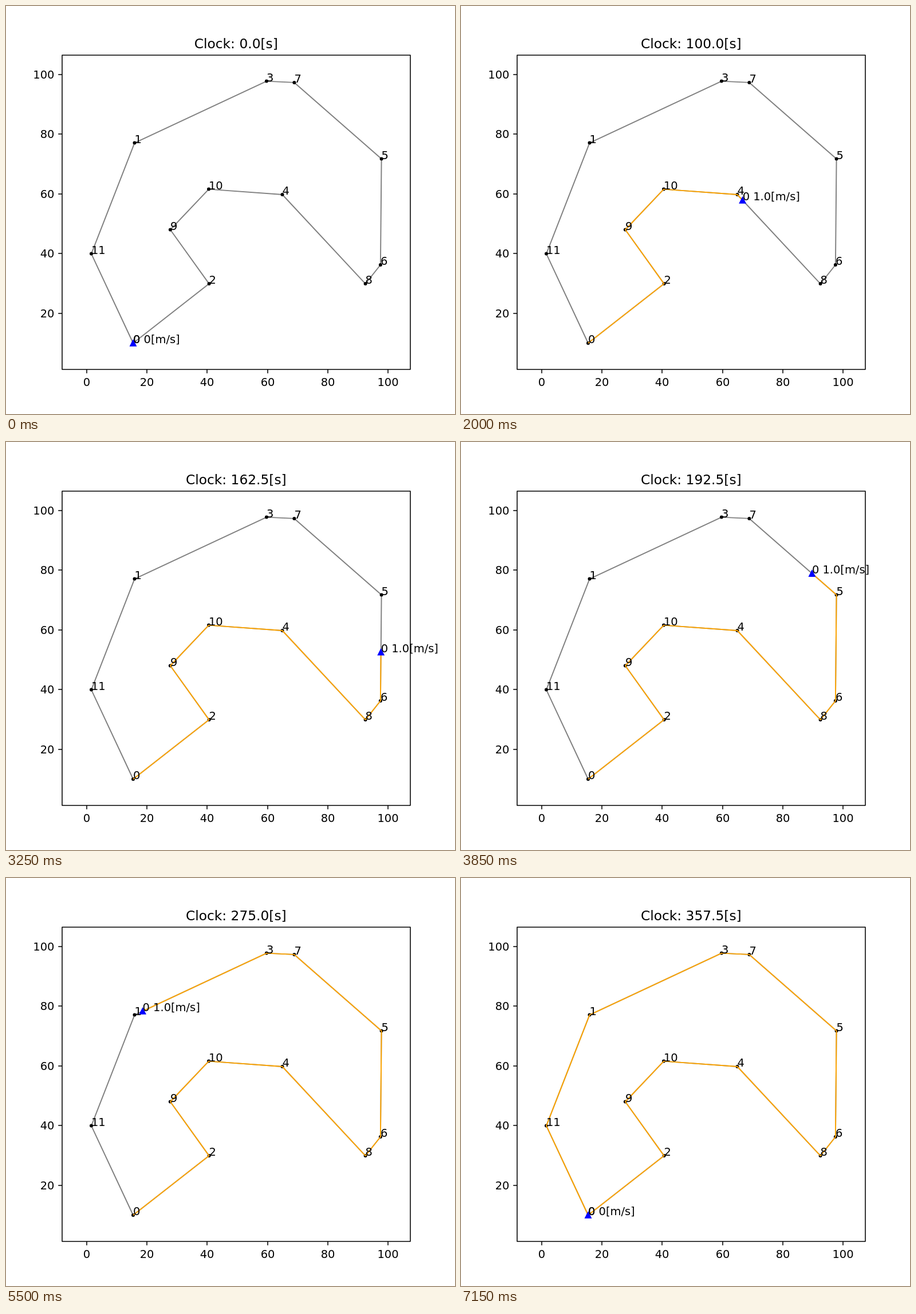
Recreate the animation shown at these times as an HTML page with a canvas. Size 784 by 714 pixels, loop 7200 ms.

```html
<!DOCTYPE html>
<html lang="en">
<head>
<meta charset="utf-8">
<title>Route clock</title>
<style>
html, body { margin: 0; width: 100%; height: 100%; overflow: hidden; background: #fff; }
canvas { display: block; }
</style>
</head>
<body>
<canvas id="stage" width="784" height="714"></canvas>
<script>
const ctx = document.getElementById("stage").getContext("2d");

const LOOP = 7200, STEP = 50, SECONDS_PER_STEP = 2.5;
const PT = 140 / 72; // pixels per point
const UNIT_X = 5.26, UNIT_Y = 5.225;
const BOX = { left: 98, right: 706, top: 86, bottom: 636 };

// The closed tour: label, x, y
const tour = [
  [0, 222, 590], [2, 354.6, 486.1], [9, 286.9, 391.5], [10, 354, 320.6],
  [4, 482.5, 330], [8, 627.6, 486.1], [6, 653.9, 453], [5, 655.6, 267.6],
  [7, 503.4, 133.9], [3, 454.9, 131.6], [1, 224.5, 239.6], [11, 149, 433.6]
].map(([label, x, y]) => ({ label, x, y }));
const route = [...tour, tour[0]];

// Length of each leg in data units
const legs = tour.map((a, i) => {
  const b = route[i + 1];
  return Math.hypot((b.x - a.x) / UNIT_X, (b.y - a.y) / UNIT_Y);
});
const total = legs.reduce((sum, d) => sum + d, 0);

// Points passed after travelling a distance; the last one is the vehicle
function travelled(dist) {
  const path = [route[0]];
  for (let i = 0; i < legs.length; i++) {
    const a = route[i], b = route[i + 1];
    const k = Math.min(1, dist / legs[i]);
    path.push({ x: a.x + (b.x - a.x) * k, y: a.y + (b.y - a.y) * k });
    if (k < 1) break;
    dist -= legs[i];
  }
  return path;
}

function text(str, x, y, size = 10, align = "left") {
  ctx.font = `${size * PT}px "DejaVu Sans", sans-serif`;
  ctx.textAlign = align;
  ctx.fillStyle = "#000";
  ctx.fillText(str, x, y);
}

function line(points, color, width) {
  ctx.beginPath();
  points.forEach(p => ctx.lineTo(p.x, p.y));
  ctx.strokeStyle = color;
  ctx.lineWidth = width * PT;
  ctx.stroke();
}

function drawAxes() {
  ctx.strokeStyle = "#000";
  ctx.lineWidth = 0.8 * PT;
  ctx.strokeRect(BOX.left, BOX.top, BOX.right - BOX.left, BOX.bottom - BOX.top);
  const tick = 3.5 * PT;
  for (let v = 0; v <= 100; v += 20) {
    const x = Math.round(141 + v * UNIT_X);
    line([{ x, y: BOX.bottom }, { x, y: BOX.bottom + tick }], "#000", 0.8);
    text(v, x, 665, 10, "center");
    if (v === 0) continue;
    const y = Math.round(642.4 - v * UNIT_Y);
    line([{ x: BOX.left, y }, { x: BOX.left - tick, y }], "#000", 0.8);
    text(v, BOX.left - 2 * tick, y + 7, 10, "right");
  }
}

function drawDot({ x, y }) {
  ctx.beginPath();
  ctx.arc(x, y, 3, 0, 2 * Math.PI);
  ctx.fillStyle = "#000";
  ctx.fill();
}

function drawVehicle({ x, y }) {
  const r = 2.5 * PT;
  ctx.beginPath();
  ctx.moveTo(x, y - r);
  ctx.lineTo(x - r, y + r);
  ctx.lineTo(x + r, y + r);
  ctx.closePath();
  ctx.lineJoin = "miter";
  ctx.lineWidth = PT;
  ctx.fillStyle = ctx.strokeStyle = "#00f";
  ctx.fill();
  ctx.stroke();
  ctx.lineJoin = "round";
}

function draw(ms) {
  const clock = Math.floor((ms % LOOP) / STEP) * SECONDS_PER_STEP;
  const path = travelled(clock);
  const pos = path[path.length - 1];
  const speed = clock > 0 && clock < total ? "1.0" : "0";

  ctx.fillStyle = "#fff";
  ctx.fillRect(0, 0, 784, 714);
  ctx.lineJoin = "round";
  ctx.fontKerning = "normal";

  line(route, "#808080", 1);
  tour.forEach(drawDot);
  line(path, "#ffa500", 1);
  drawVehicle(pos);
  drawAxes();
  tour.forEach(p => text(p.label, p.x, p.y));
  text(`0 ${speed}[m/s]`, pos.x, pos.y);
  text(`Clock: ${clock.toFixed(1)}[s]`, 401.8, 74, 12, "center");
}

let start;
function tick(now) {
  start ??= now;
  draw(now - start);
  requestAnimationFrame(tick);
}
draw(0);
requestAnimationFrame(tick);
</script>
</body>
</html>
```
